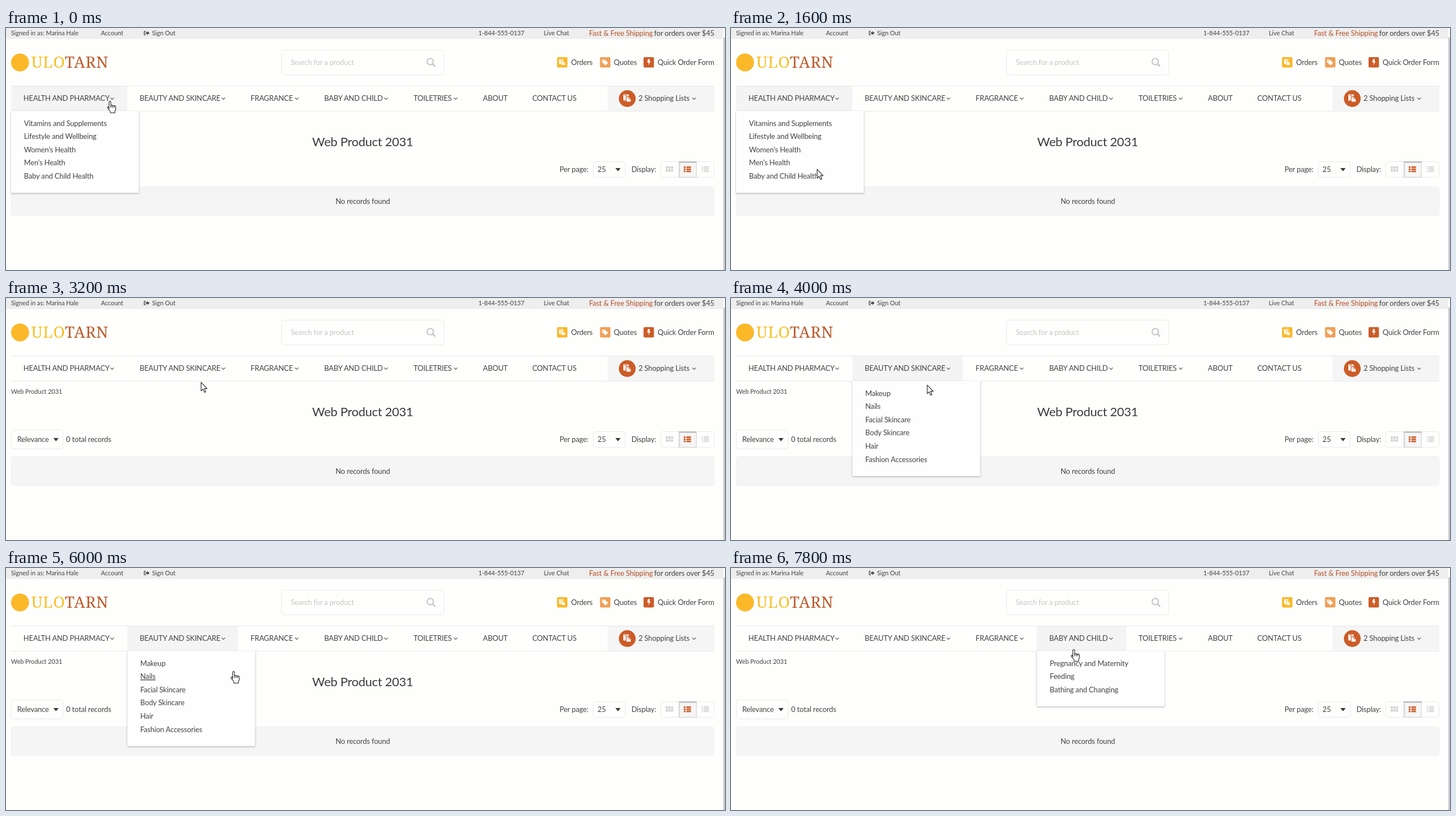
Write an HTML page that moves like this. It is 1280 px wide and 432 px high and loops after 8 s.

```html
<!DOCTYPE html>
<html lang="en">
<head>
<meta charset="utf-8">
<title>Store menu</title>
<style>
html, body { margin: 0; width: 100%; height: 100%; overflow: hidden; background: #fefefd; }
svg { display: block; position: absolute; left: 0; top: 0; }
text { font-family: Lato, "Open Sans", sans-serif; font-size: 13px; letter-spacing: -.15px; fill: #434343; white-space: pre; }
.small { font-size: 11px; letter-spacing: -.05px; }
.title { font-size: 22px; letter-spacing: -.25px; fill: #3a3a3a; }
.brand { font-family: "Noto Serif", serif; font-size: 28px; letter-spacing: .7px; }
.box { fill: #fefefd; stroke: #e9e9e9; }
.panel { fill: #fefefe; filter: drop-shadow(0 1px 1.5px rgba(0, 0, 0, .32)); }
.hover { text-decoration: underline; }
</style>
</head>
<body>
<svg id="stage" width="1280" height="432" viewBox="0 0 1280 432"></svg>
<script>
const LOOP = 8000, STEP = 200;
const ORANGE = '#cb5c27', GOLD = '#fbb829', PEACH = '#f0a056', MUTED = '#d2d2d2';
const FIRST_ROW = 169.8, ROW = 23.6;

const tabs = [
  { label: 'HEALTH AND PHARMACY', x: 9, w: 207, arrow: 189, items:
    ['Vitamins and Supplements', 'Lifestyle and Wellbeing', 'Women’s Health', 'Men’s Health', 'Baby and Child Health'] },
  { label: 'BEAUTY AND SKINCARE', x: 216, w: 197, arrow: 387, items:
    ['Makeup', 'Nails', 'Facial Skincare', 'Body Skincare', 'Hair', 'Fashion Accessories'] },
  { label: 'FRAGRANCE', x: 413.5, w: 130.5, arrow: 517.5, items: ['Perfume'] },
  { label: 'BABY AND CHILD', x: 544.5, w: 159.5, arrow: 676.5, items:
    ['Pregnancy and Maternity', 'Feeding', 'Bathing and Changing'] },
  { label: 'TOILETRIES', x: 703.5, arrow: 800.5 },
  { label: 'ABOUT', x: 827 },
  { label: 'CONTACT US', x: 915 }
];

// Pointer tip: time, x, y
const path = [
  [0, 185, 131], [400, 185, 131], [1600, 153, 252], [2400, 153, 263], [2600, 153, 263],
  [3200, 347, 150], [3600, 345, 134], [3800, 345, 134], [4800, 367, 241], [5400, 367, 225],
  [5800, 367, 225], [6000, 405, 185], [6200, 455, 146], [6400, 520, 141], [6800, 520, 141],
  [7200, 600, 143], [7400, 600, 143], [7800, 610, 146], [8000, 610, 146]
];
// Open menu from each time on; -1 is none
const opens = [[0, 0], [3000, -1], [3400, 1], [6200, 2], [7000, 3]];

const text = (x, y, s, cls = '', extra = '') =>
  `<text x="${x}" y="${y}" class="${cls}" ${extra}>${s.replace(/&/g, '&amp;')}</text>`;
const rect = (x, y, w, h, fill, r = 0, extra = '') =>
  `<rect x="${x}" y="${y}" width="${w}" height="${h}" rx="${r}" fill="${fill}" ${extra}/>`;
const box = (x, y, w, h, r = 4) =>
  `<rect class="box" x="${x + .5}" y="${y + .5}" width="${w - 1}" height="${h - 1}" rx="${r}"/>`;
const shape = (d, fill, extra = '') => `<path d="${d}" fill="${fill}" ${extra}/>`;
const line = (d, color, width = 1) => shape(d, 'none', `stroke="${color}" stroke-width="${width}"`);
const chevron = x => line(`M${x - 3.2} 124.3l3.2 3.2 3.2-3.2`, '#555', 1.1);
const caret = x => shape(`M${x - 4.7} 250h9.4l-4.7 5.7z`, '#3a3a3a');

function copyIcon(x, y, k, back) {
  return `<g transform="translate(${x} ${y}) scale(${k})">` +
    rect(-7, -7, 9.6, 11, '#fff', 1) + rect(-5, -6, 5.4, 1.2, back) +
    shape('M-2 -3H3L6.8 .8V6.5H-2z', '#fff', `stroke="${back}" stroke-width="1.2"`) +
    line('M2.8 -3V1H6.8', back) + '</g>';
}

function rows(x, n, h, gap, color) {
  let out = '';
  for (let i = 0; i < n; i++) {
    const y = 247 + i * gap;
    out += rect(x, y, h + .5, h, color) + rect(x + h + 2, y, 11 - h, h, color);
  }
  return out;
}

function grid(x, color) {
  let out = '';
  for (let i = 0; i < 6; i++)
    out += rect(x + i % 3 * 4.7, 247 + Math.floor(i / 3) * 5.3, 3.7, 4.2, color, .5);
  return out;
}

function topBar() {
  return rect(0, 0, 1277, 19.5, '#eeeeee') +
    text(9, 13, 'Signed in as: Marina Hale', 'small') +
    text(169, 13, 'Account', 'small') +
    line('M249 5.8h-2.8v6.4h2.8', '#444', 1.3) +
    shape('M248.5 7.8h3V5.6L255.5 9l-4 3.4v-2.2h-3z', '#444') +
    text(260, 13, 'Sign Out', 'small') +
    text(841, 13, '1-844-555-0137', 'small') +
    text(957.5, 13, 'Live Chat', 'small') +
    text(1038, 13.5, 'Fast & Free Shipping', '', 'style="fill:#b8522a"') +
    text(1261, 13.5, 'for orders over $45', '', 'text-anchor="end"');
}

function header() {
  return `<circle cx="25" cy="61.5" r="16" fill="${GOLD}"/>` +
    text(45, 71, '<tspan fill="#fbbf24">ULO</tspan><tspan fill="#bd5a2c">TARN</tspan>', 'brand') +
    box(490, 39, 290, 45) +
    text(507, 65.5, 'Search for a product', '', 'style="fill:#c6c6c6"') +
    `<circle cx="755.3" cy="60" r="5.6" fill="none" stroke="#c9c9c9" stroke-width="2.3"/>` +
    line('M759.5 64.2l4.5 4.5', '#c9c9c9', 2.8) +
    rect(981, 52, 18.5, 18.5, GOLD, 2) + copyIcon(990.2, 61.2, .8, GOLD) +
    text(1006, 65.5, 'Orders') +
    rect(1057.5, 52, 18.5, 18.5, PEACH, 2) +
    shape('M1061 56.5h4.8l6.2 5.6-4.6 4.6-6.4-5.8z', '#fff') +
    `<circle cx="1063.3" cy="58.8" r="1" fill="${PEACH}"/>` +
    text(1082, 65.5, 'Quotes') +
    rect(1135, 52, 18.5, 18.5, ORANGE, 2) +
    shape('M1143 55.5h3.5l-1.3 3.6h2.3l-4 8 .8-5.6h-2.8z', '#fff') +
    text(1160, 65.5, 'Quick Order Form');
}

function navBar() {
  return rect(1071, 103, 190, 46, '#f5f5f5') +
    tabs.map((t, i) => t.items ? rect(t.x, 104, t.w, 44, '#f4f4f4', 0, `id="tab${i}"`) : '').join('') +
    line('M9 103.5H1261M9 148.5H1261', '#e8e8e8') +
    tabs.map(t => text(t.x + 22, 129.7, t.label) + (t.arrow ? chevron(t.arrow) : '')).join('') +
    `<circle cx="1106" cy="126" r="15" fill="${ORANGE}"/>` + copyIcon(1106, 125.6, 1, ORANGE) +
    text(1126, 130, '2 Shopping Lists') + chevron(1225);
}

function content() {
  return text(9, 170.5, 'Web Product 2031', 'small') +
    text(635, 211, 'Web Product 2031', 'title', 'text-anchor="middle"') +
    box(9, 235, 93, 35) + text(20, 256.5, 'Relevance') + caret(89) +
    text(107, 256.5, '0 total records') +
    text(985.5, 256.5, 'Per page:') + box(1045, 238, 58, 29) + text(1053, 256.5, '25') + caret(1089.5) +
    text(1113.5, 256.5, 'Display:') + box(1165, 238, 96, 29) +
    rect(1198, 238.5, 31, 28, '#f6f6f6', 0, 'stroke="#cccccc"') +
    line('M1198 239.5h31', '#b5b5b5', 2) + line('M1199 240v26', '#d5d5d5', 1.5) +
    grid(1174.5, MUTED) + rows(1206.5, 3, 2.8, 3.8, ORANGE) + rows(1238.5, 4, 1.7, 2.8, MUTED) +
    rect(9.5, 283.5, 1251, 51, '#f5f5f5', 4, 'stroke="#f0f0f0"') +
    text(635.2, 313.7, 'No records found', '', 'text-anchor="middle"') +
    rect(1277, 17, 3, 415, '#cbcbce');
}

function menu(t, i) {
  if (!t.items) return '';
  const h = 28.4 + ROW * t.items.length;
  return `<g id="menu${i}">` + rect(t.x, 148, 227.5, h, '#fefefe', 0, 'class="panel"') +
    t.items.map((s, k) => text(t.x + 23, FIRST_ROW + ROW * k + 4.7, s)).join('') + '</g>';
}

const pointer = '<g id="pointer" stroke="#222" stroke-width="1.1" stroke-linejoin="round">' +
  '<g id="hand">' +
  shape('M-1.5 13V1.2a1.6 1.6 0 0 1 3.2 0V8a1.5 1.5 0 0 1 3 .3a1.5 1.5 0 0 1 2.8 .5a1.4 1.4 0 0 1 2.8 .6' +
    'V14.5L8.8 17.5V20.5H.8V18L-4.4 11.6a1.5 1.5 0 0 1 2.2-1.8z', '#fff') +
  shape('M1.7 8v3.5M4.7 8.3v3.2M7.5 8.8v2.7', 'none') + '</g>' +
  shape('M.3 .3V15.8L3.8 12.6 6.3 18.5 8.7 17.5 6.2 11.6H11z', '#fff', 'id="arrow"') + '</g>';

document.getElementById('stage').innerHTML =
  topBar() + header() + navBar() + content() + tabs.map(menu).join('') + pointer;

const el = id => document.getElementById(id);
const show = (node, on) => node.style.display = on ? '' : 'none';
const parts = tabs.map((t, i) => t.items && {
  tab: el('tab' + i), menu: el('menu' + i), links: [...el('menu' + i).querySelectorAll('text')]
}).filter(Boolean);
const cursor = el('pointer'), hand = el('hand'), arrow = el('arrow');

function tipAt(t) {
  const i = path.findIndex(p => p[0] > t);
  const [t0, x0, y0] = path[i - 1], [t1, x1, y1] = path[i];
  const k = (t - t0) / (t1 - t0);
  return [Math.round(x0 + (x1 - x0) * k), Math.round(y0 + (y1 - y0) * k)];
}

function draw(now) {
  const t = Math.floor(now % LOOP / STEP) * STEP;
  const [x, y] = tipAt(t);
  const open = opens.filter(o => o[0] <= t).pop()[1];
  let active = y > 103 && y < 148;
  parts.forEach((p, i) => {
    show(p.tab, i === open);
    show(p.menu, i === open);
    p.links.forEach((link, k) => {
      const over = i === open && Math.abs(y - FIRST_ROW - ROW * k) < 9;
      link.setAttribute('class', over ? 'hover' : '');
      active = active || over;
    });
  });
  show(hand, active);
  show(arrow, !active);
  cursor.setAttribute('transform', `translate(${x} ${y})`);
}

function tick() {
  draw(performance.now());
  requestAnimationFrame(tick);
}
tick();
</script>
</body>
</html>
```
